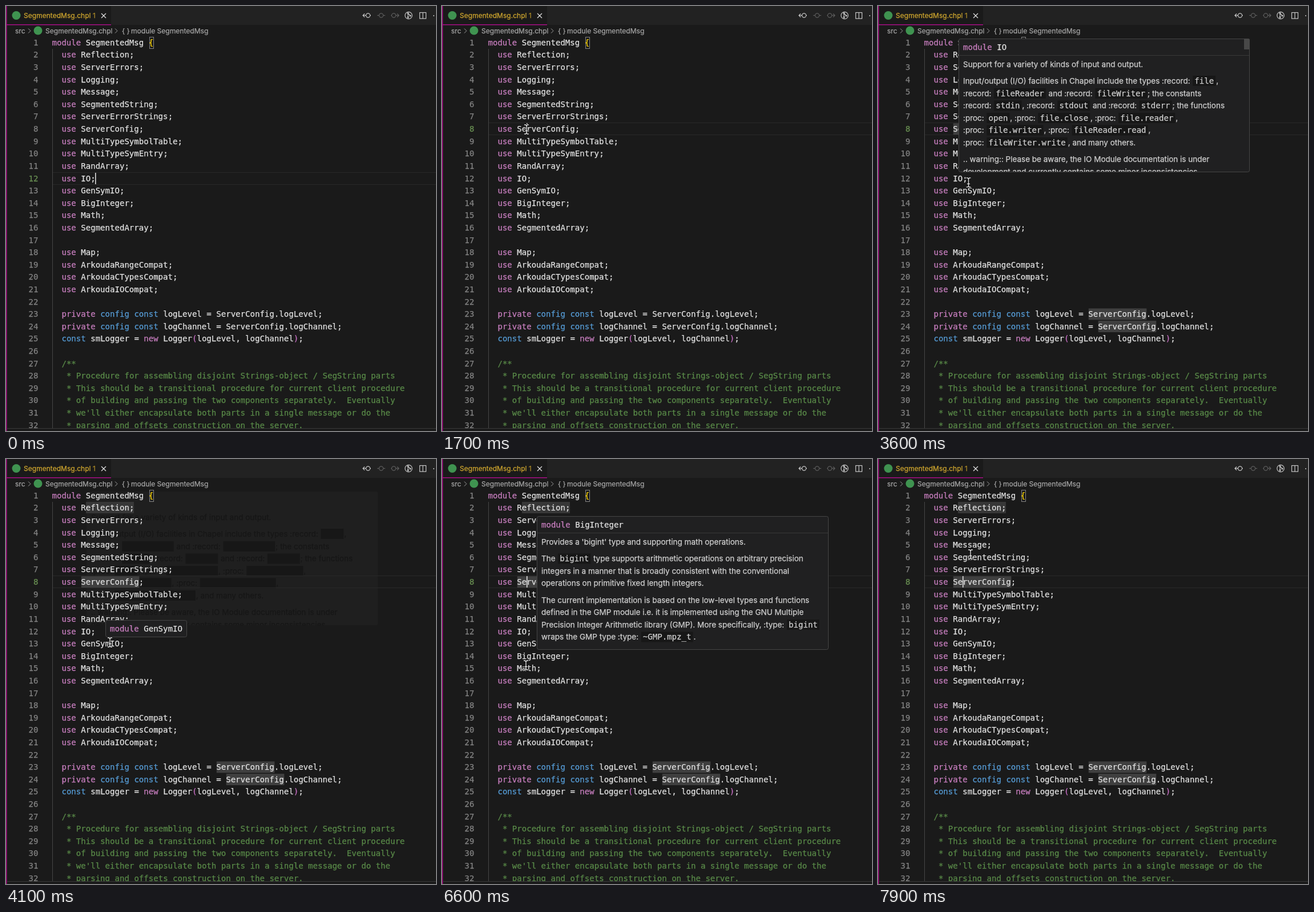
An HTML page with a canvas that plays this animation: 753 by 744 pixels, repeating every 8 s.

```html
<!DOCTYPE html>
<html lang="en">
<head>
<meta charset="utf-8">
<title>Editor hover</title>
<style>
html, body { margin: 0; width: 100%; height: 100%; overflow: hidden; background: #1a1a1a; }
canvas { display: block; }
</style>
</head>
<body>
<canvas id="stage" width="753" height="744"></canvas>
<script>
const ctx = document.getElementById('stage').getContext('2d');
const LOOP = 8000, LEFT = 81, TOP = 64, ROW = 21.61, COL = 8.464;
const MONO = '14.06px "DejaVu Sans Mono", monospace';
const UI = '12.05px Inter, sans-serif';
const DOC = '13.5px Inter, sans-serif';
const C = {
  bg: '#1a1a1a', bar: '#222222', text: '#e2e2e2', pink: '#c97fc0', blue: '#569cd6', gold: '#ffd700',
  comment: '#598a48', number: '#838383', active: '#6a9153', magenta: '#a80f86',
  panel: '#202021', border: '#454545', chip: '#171717', doc: '#d0d0d0', mark: '#3f3f3f'
};

const modules = ['Reflection', 'ServerErrors', 'Logging', 'Message', 'SegmentedString',
  'ServerErrorStrings', 'ServerConfig', 'MultiTypeSymbolTable', 'MultiTypeSymEntry', 'RandArray',
  'IO', 'GenSymIO', 'BigInteger', 'Math', 'SegmentedArray', '', 'Map', 'ArkoudaRangeCompat',
  'ArkoudaCTypesCompat', 'ArkoudaIOCompat'];
const code = [
  'module SegmentedMsg {',
  ...modules.map(m => m && `  use ${m};`),
  '',
  '  private config const logLevel = ServerConfig.logLevel;',
  '  private config const logChannel = ServerConfig.logChannel;',
  '  const smLogger = new Logger(logLevel, logChannel);',
  '',
  '  /**',
  '   * Procedure for assembling disjoint Strings-object / SegString parts',
  '   * This should be a transitional procedure for current client procedure',
  '   * of building and passing the two components separately.  Eventually',
  "   * we'll either encapsulate both parts in a single message or do the",
  '   * parsing and offsets construction on the server.'
];

// Each row is [centre y, text]; backticks mark inline code.
const ioHover = {
  x: 141, y: 57, w: 510, h: 234, name: 'IO', thumb: 19,
  rows: [
    [102, 'Support for a variety of kinds of input and output.'],
    [131, 'Input/output (I/O) facilities in Chapel include the types :record: `file`,'],
    [153, ':record: `fileReader` and :record: `fileWriter`; the constants'],
    [174.5, ':record: `stdin`, :record: `stdout` and :record: `stderr`; the functions'],
    [196, ':proc: `open`, :proc: `file.close`, :proc: `file.reader`,'],
    [217.5, ':proc: `file.writer`, :proc: `fileReader.read`,'],
    [239, ':proc: `fileWriter.write`, and many others.'],
    [268.5, '.. warning:: Please be aware, the IO Module documentation is under'],
    [290, 'development and currently contains some minor inconsistencies.']
  ]
};
const genHover = { x: 174, y: 282, w: 143, h: 30, name: 'GenSymIO', rows: [] };
const bigHover = {
  x: 166, y: 100, w: 511, h: 234, name: 'BigInteger', thumb: 28,
  rows: [
    [145.5, "Provides a 'bigint' type and supporting math operations."],
    [174.5, 'The `bigint` type supports arithmetic operations on arbitrary precision'],
    [196, 'integers in a manner that is broadly consistent with the conventional'],
    [217.5, 'operations on primitive fixed length integers.'],
    [247, 'The current implementation is based on the low-level types and functions'],
    [268.5, 'defined in the GMP module i.e. it is implemented using the GNU Multiple'],
    [290, 'Precision Integer Arithmetic library (GMP). More specifically, :type: `bigint`'],
    [311.5, 'wraps the GMP type :type: `~GMP.mpz_t`.']
  ]
};

// Pointer path: [time, x, y]
const path = [
  [1100, 236, 752], [1500, 148, 216], [1850, 148, 216], [2500, 143, 301], [3450, 143, 301],
  [3800, 182, 321], [4650, 182, 321], [5000, 168, 338], [5950, 168, 338], [6600, 147, 361],
  [6900, 147, 361], [7700, 164, 201], [7900, 162, 167], [8000, 162, 167]
];

const clamp = v => Math.max(0, Math.min(1, v));
const ramp = (t, a, b) => clamp((t - a) / (b - a));
const ease = p => p * p * (3 - 2 * p);
const rowY = n => TOP + (n - 1) * ROW;

function rect(x, y, w, h, fill) {
  ctx.fillStyle = fill;
  ctx.fillRect(x, y, w, h);
}
// A hairline outline gives the glyphs a slightly heavier weight.
function text(s, x, y, font, fill) {
  ctx.font = font;
  ctx.fillStyle = fill;
  ctx.fillText(s, x, y);
  pen(fill, 0.25);
  ctx.strokeText(s, x, y);
}
function disc(x, y, r, fill) {
  ctx.fillStyle = fill;
  ctx.beginPath();
  ctx.arc(x, y, r, 0, 7);
  ctx.fill();
}
function ring(x, y, r) {
  ctx.beginPath();
  ctx.arc(x, y, r, 0, 7);
  ctx.stroke();
}
function line(...p) {
  ctx.beginPath();
  for (let i = 0; i < p.length; i += 2) ctx.lineTo(p[i], p[i + 1]);
  ctx.stroke();
}
function pen(color, width = 1) {
  ctx.strokeStyle = color;
  ctx.lineWidth = width;
}

function colorOf(token) {
  if (/^(module|use|private|new)$/.test(token)) return C.pink;
  if (/^(config|const)$/.test(token)) return C.blue;
  if (token === '{') return C.gold;
  if (/^[()]$/.test(token)) return '#c76fc4';
  return C.text;
}
function codeLine(s, x, y) {
  const comment = /^ +(\/\*|\*)/.test(s);
  for (const m of s.matchAll(comment ? /\S+/g : /\w+|[^\w\s]/g)) {
    text(m[0], x + m.index * COL, y, MONO, comment ? C.comment : colorOf(m[0]));
  }
}

function toolbar() {
  const bright = '#c5c5c5', dim = '#5c5c5c';
  [[632, -1, bright], [657, 0, dim], [681, 1, dim]].forEach(([x, dir, color]) => {
    pen(color, 1.2);
    const c = x + (dir < 0 ? 2 : dir > 0 ? -2 : 0);
    ring(c, 16.5, 3.6);
    line(x - 7, 16.5, c - 3.6, 16.5);
    line(c + 3.6, 16.5, x + 7, 16.5);
    if (dir) {
      const tip = x + dir * 7;
      line(tip - dir * 3, 13.5, tip, 16.5, tip - dir * 3, 19.5);
    }
  });
  pen(bright, 1.2);
  ring(705, 16.5, 6.2);
  line(704, 10.5, 704, 22);
  line(704, 13, 708, 17);
  disc(704, 13, 1.5, bright);
  disc(704, 19.5, 1.5, bright);
  disc(708, 17, 1.5, bright);
  ctx.strokeRect(724.5, 11.5, 11, 10.5);
  line(730, 11.5, 730, 22);
  disc(749, 17, 1, bright);
}

function chrome() {
  rect(184, 0, 569, 33, C.bar);
  rect(0, 32, 184, 1.5, C.magenta);
  rect(0, 0, 1.5, 744, C.magenta);
  disc(18, 16.5, 7.5, '#3f9350');
  text('SegmentedMsg.chpl', 31, 21, UI, '#cca42e');
  text('1', 152, 21, UI, '#a98826');
  pen('#dddddd', 1.3);
  line(167, 13, 175, 21);
  line(175, 13, 167, 21);
  toolbar();

  const grey = '#a3a3a3';
  text('src', 16, 48, UI, grey);
  disc(56, 43, 7.5, '#3f9350');
  text('SegmentedMsg.chpl', 69, 48, UI, grey);
  text('{ }', 203, 48, UI, grey);
  text('module SegmentedMsg', 219, 48, UI, grey);
  pen(grey);
  for (const x of [39, 191]) line(x, 39.5, x + 4, 43.5, x, 47.5);
}

function editor(t) {
  const clicked = t >= 1500, current = clicked ? 8 : 12;
  ctx.save();
  ctx.beginPath();
  ctx.rect(0, 52, 753, 687);
  ctx.clip();

  const y = Math.round(rowY(current));
  rect(81, y - 11, 672, 1, '#282828');
  rect(81, y + 10, 672, 1, '#282828');
  rect(81, 75, 1, 664, '#454545');

  if (t >= 1900) {
    [[8, 6], [23, 34], [24, 36]].forEach(([n, col]) =>
      rect(LEFT + col * COL, rowY(n) - 10, 12 * COL, 20, C.mark));
  }
  if (t >= 4000) rect(140, 75, 84, 20, '#373737');

  pen('#858585');
  ctx.strokeRect(251.5, 54.5, 7, 20);
  code.forEach((s, i) => {
    const n = i + 1, base = rowY(n) + 4.8;
    ctx.textAlign = 'right';
    text(n, 56.5, base, MONO, n === current ? C.active : C.number);
    ctx.textAlign = 'left';
    codeLine(s, LEFT - 0.5, base);
  });

  const on = clicked ? t % 1000 >= 500 : t % 1000 < 500;
  if (on) rect(clicked ? 148 : 156, y - 10, 1.6, 20, '#dddddd');
  ctx.restore();
  rect(2, 739, 751, 1, '#3a3a3a');
}

// Lays out prose with inline code chips.
function docRow(s, x, y, ghost) {
  s.split('`').forEach((part, i) => {
    const chip = i % 2, pad = chip ? 4 : 0, font = chip ? MONO : DOC;
    ctx.font = font;
    const w = ctx.measureText(part).width;
    x += pad;
    if (chip) rect(x - 3, y - 9, w + 6, 18, ghost ? '#000000' : C.chip);
    if (!ghost || !chip) text(part, x, y + 4.8, font, ghost ? '#000000' : C.doc);
    x += w + pad;
  });
}

function hover(h, alpha, thumb = 0, ghost = false) {
  if (alpha <= 0) return;
  ctx.save();
  ctx.globalAlpha = alpha;
  ctx.beginPath();
  ctx.roundRect(h.x, h.y, h.w, h.h, 3);
  ctx.fillStyle = ghost ? '#2e2e2e' : C.panel;
  ctx.fill();
  ctx.clip();
  if (!ghost) {
    text('module', h.x + 8, h.y + 19.5, MONO, C.pink);
    text(h.name, h.x + 8 + 7 * COL, h.y + 19.5, MONO, C.text);
    if (h.rows.length) rect(h.x, h.y + 29, h.w, 1, '#383838');
  }
  h.rows.forEach(([y, s]) => docRow(s, h.x + 8, y, ghost));
  if (thumb && h.thumb) {
    ctx.globalAlpha = alpha * thumb;
    rect(h.x + h.w - 10, h.y, 10, h.thumb, '#484848');
  }
  ctx.restore();
  if (ghost) return;
  ctx.globalAlpha = alpha;
  pen(C.border);
  ctx.beginPath();
  ctx.roundRect(h.x + 0.5, h.y + 0.5, h.w - 1, h.h - 1, 3);
  ctx.stroke();
  ctx.globalAlpha = 1;
}

// Faint trace of the closed panel, behind the code.
function afterglow(t) {
  if (t >= 4050) hover(ioHover, 0.25 * (1 - ramp(t, 4150, 4500)), 0, true);
}

function hovers(t) {
  if (t >= 2750) hover(ioHover, (0.8 + 0.2 * ramp(t, 2800, 3000)) * (1 - ramp(t, 3980, 4050)), 1);
  hover(genHover, ramp(t, 4000, 4090) * (1 - ramp(t, 4880, 5000)));
  hover(bigHover, ramp(t, 5340, 5400) * (1 - ramp(t, 6900, 7050)), 1 - ramp(t, 5950, 6550));
}

function pointer(t) {
  const i = path.findIndex(p => t < p[0]);
  if (i < 1) return;
  const [t0, x0, y0] = path[i - 1], [t1, x1, y1] = path[i];
  const p = ease(ramp(t, t0, t1));
  ctx.save();
  ctx.translate(x0 + (x1 - x0) * p, y0 + (y1 - y0) * p);
  ctx.lineCap = 'round';
  for (const [color, width] of [['#151515', 3.2], ['#e8e8e8', 1.3]]) {
    pen(color, width);
    line(-3.5, -8, -1.5, -8, 0, -6.5, 1.5, -8, 3.5, -8);
    line(-3.5, 8, -1.5, 8, 0, 6.5, 1.5, 8, 3.5, 8);
    line(0, -6.5, 0, 6.5);
    line(-2, 2.5, 2, 2.5);
  }
  ctx.restore();
}

function draw(now) {
  const t = now % LOOP;
  rect(0, 0, 753, 744, C.bg);
  chrome();
  afterglow(t);
  editor(t);
  hovers(t);
  pointer(t);
}

const start = performance.now();
function tick() {
  draw(performance.now() - start);
  requestAnimationFrame(tick);
}
tick();
</script>
</body>
</html>
```
